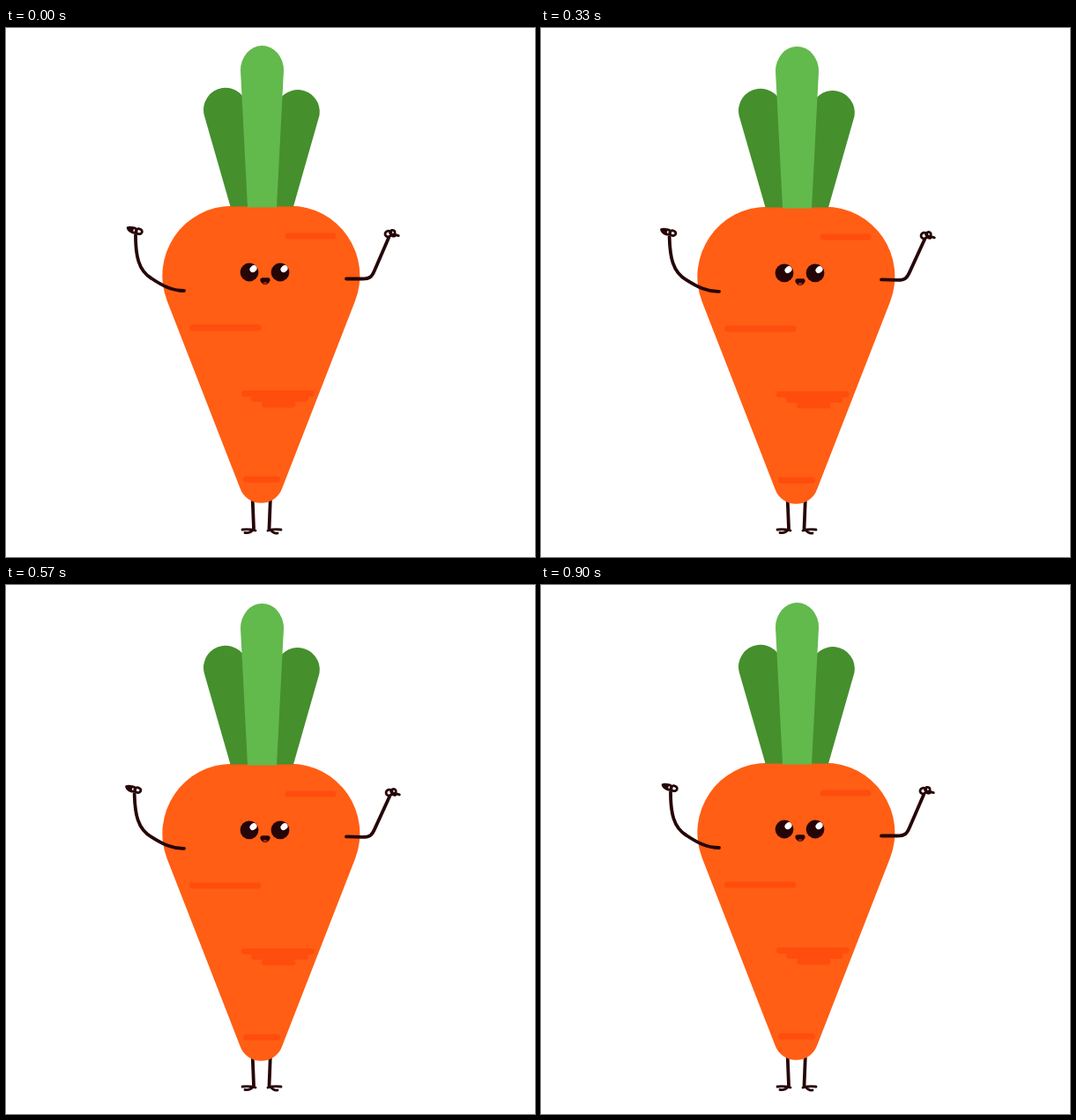
An HTML page that plays this animation: 600x600 px, repeating every 0.93 s.

```html
<!DOCTYPE html>
<html lang="en">
<head>
<meta charset="utf-8">
<title>Bouncing carrot</title>
<style>
  html, body { margin: 0; width: 100%; height: 100%; overflow: hidden; background: #fff; }
  svg { display: block; width: 100vw; height: 100vh; }
  .line { fill: none; stroke: #260507; stroke-width: 3.8; stroke-linecap: round; stroke-linejoin: round; }
  .thin { stroke-width: 2.8; }
  .mark { fill: none; stroke: #ff4d0e; stroke-width: 7; stroke-linecap: round; }
</style>
</head>
<body>
<svg viewBox="0 0 600 600">
  <g class="line">
    <path d="M279.500 530 L281 568 M300 530 L298.500 568"/>
    <path class="thin" d="M268 569 Q275 568 283 570 M280 569 Q277 573.500 271 572.500"/>
    <path class="thin" d="M312 569 Q304 568 297 570 M300 569 Q303 573.500 308 573"/>
  </g>
  <g id="carrot">
    <path fill="#ff5e14" d="M256.500 201.700 H322 A79.300 79.300 0 0 1 396 309.600 L313.200 522 A25.300 25.300 0 0 1 265.500 522 L182.700 309.600 A79.300 79.300 0 0 1 256.500 201.700 Z"/>
    <path fill="#458f2d" d="M254.500 202.500 L224.800 99 A25 25 0 1 1 274 92 L280 202.500 Z"/>
    <path fill="#458f2d" d="M326 202.500 L355.500 99 A25 25 0 1 0 306 92 L301 202.500 Z"/>
    <path fill="#62b94c" d="M274 203.500 L266 48 A24.500 28 0 0 1 315 48 L307 203.500 Z"/>
    <path class="mark" d="M320 236 H371 M211.500 340 H286 M270.500 414.500 H346 M281.500 420.500 H339 M293.500 427 H325 M272.500 512 H307.500"/>
    <g fill="#260507">
      <circle cx="276" cy="277" r="10.400"/>
      <circle cx="311" cy="277" r="10.400"/>
    </g>
    <g fill="#fff">
      <ellipse cx="280.500" cy="273.200" rx="4.300" ry="3.500" transform="rotate(-40 280.500 273.200)"/>
      <ellipse cx="315.500" cy="273.200" rx="4.300" ry="3.500" transform="rotate(-40 315.500 273.200)"/>
    </g>
    <g id="mouth">
      <path fill="#260507" d="M291 283.200 H297 Q300 283.500 299.500 286.500 Q298.500 289 296.500 290.300 Q294 291.500 291.200 290.300 Q288.500 288.500 288.300 286 Q288.300 283.500 291 283.200 Z"/>
      <ellipse cx="294" cy="289.300" rx="2.300" ry="1.100" fill="#b02a1c"/>
    </g>
    <g id="left" class="line">
      <path d="M202 298 C188 298 177 292 165 284 C150 275 147 258 147 235"/>
      <g class="thin" transform="translate(147 235) rotate(12)">
        <ellipse cx="2.800" cy="-5" rx="3.600" ry="2.900"/>
        <ellipse cx="-2.800" cy="-5" rx="3" ry="2.700"/>
        <path d="M-4 -7.500 Q-8 -8 -10.500 -6.500 Q-9 -3 -4 -2.500 M-9 -6 L-5 -5"/>
      </g>
    </g>
    <g id="right" class="line">
      <path d="M386 284.500 H404 C413 284.500 415 282 418 275 L434 238"/>
      <g class="thin" transform="translate(434 238) rotate(-12)">
        <ellipse cx="0.500" cy="-4.500" rx="3.600" ry="3.300"/>
        <ellipse cx="5.500" cy="-5" rx="2.800" ry="2.600"/>
        <path d="M4 -2 Q7 1 8 -2 L11.500 0"/>
      </g>
    </g>
  </g>
</svg>
<script>
  const LOOP = 930, STEP = 30, BOUNCE = 300, DROP = 10, SWING = 13;
  const start = performance.now();
  const move = (id, value) => document.getElementById(id).setAttribute("transform", value);

  function draw(now) {
    const time = Math.max(0, now - start) % LOOP;
    const held = Math.floor(time / STEP) * STEP;
    const k = (1 - Math.cos(2 * Math.PI * held / BOUNCE)) / 2;
    const squash = 0.16 * k;
    move("carrot", `translate(0 ${DROP * k})`);
    move("left", `rotate(${-SWING * k} 196 298)`);
    move("right", `rotate(${SWING * k} 386 284.5)`);
    move("mouth", `translate(0 ${283 * squash}) scale(1 ${1 - squash})`);
    requestAnimationFrame(draw);
  }
  draw(start);
</script>
</body>
</html>
```
